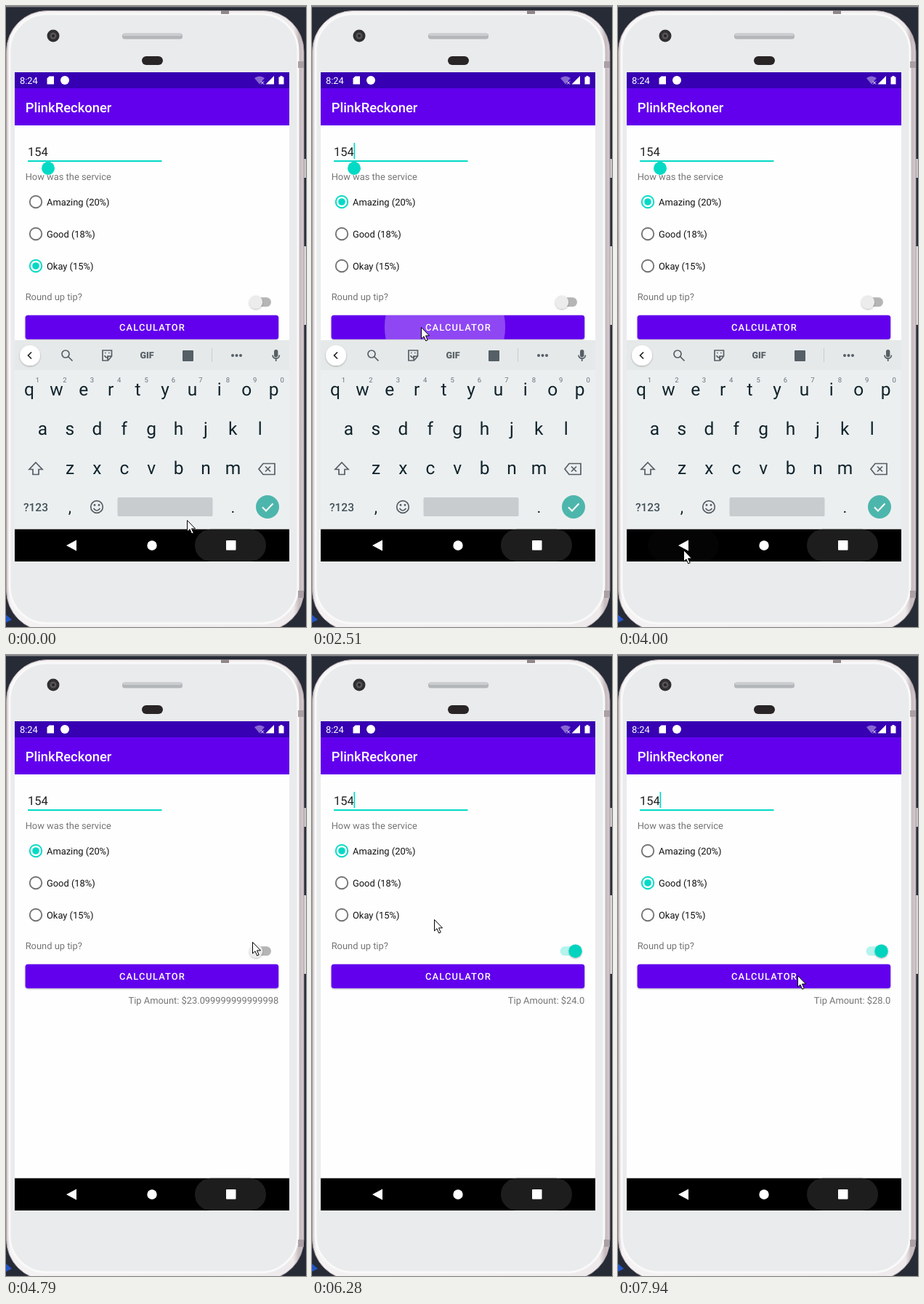
An HTML page for the animation above (8000 ms loop, 413 by 853 pixels).

```html
<!DOCTYPE html>
<html lang="en">
<head>
<meta charset="utf-8">
<title>Tip form demo</title>
<style>
html, body { margin: 0; width: 100%; height: 100%; overflow: hidden; background: #262b36; }
svg { display: block; width: 100vw; height: 100vh; }
text { font-family: Roboto, sans-serif; font-size: 12.88px; white-space: pre; text-rendering: geometricPrecision; }
.mid { text-anchor: middle; }
.soft { fill: #757575; }
.line { fill: none; stroke: #555f65; stroke-width: 1.7; }
</style>
</head>
<body>
<svg viewBox="0 0 413 853">
  <defs>
    <clipPath id="screenClip"><rect x="12" y="91" width="378" height="627.700"/></clipPath>
    <clipPath id="btnClip"><rect x="26.600" y="424.700" width="348.600" height="33.100" rx="3.500"/></clipPath>
    <filter id="shade" x="-30%" y="-30%" width="160%" height="170%">
      <feDropShadow dx="0" dy="1" stdDeviation="1" flood-color="#000" flood-opacity=".3"/>
    </filter>
    <linearGradient id="rim">
      <stop offset="0" stop-color="#cfc5c9"/><stop offset=".012" stop-color="#f5f2f3"/>
      <stop offset=".965" stop-color="#eeeaec"/><stop offset=".985" stop-color="#c4b9bd"/>
      <stop offset="1" stop-color="#d6cdd0"/>
    </linearGradient>
  </defs>

  <!-- phone body -->
  <rect width="413" height="853" fill="#262b36"/>
  <rect width="413" height="1.5" fill="#8b8d90"/>
  <path d="M0 836l8 7-8 4z" fill="#2456c8"/>
  <rect x="407" y="210" width="7" height="26" rx="2" fill="#c9c5c8"/>
  <rect x="407" y="330" width="7" height="108" rx="2" fill="#dcd8da"/>
  <rect x=".5" y="6.500" width="409.500" height="852" rx="56" fill="url(#rim)" stroke="#a99da2"/>
  <rect x="5" y="11" width="397" height="837" rx="51" fill="#e9ebec" stroke="#f9f9f9" stroke-width="3"/>
  <rect x="296" y="6" width="11" height="5" fill="#8e8689"/>
  <rect x="402" y="76" width="8" height="9" fill="#aaa0a4"/>
  <rect x="402" y="803" width="8" height="10" fill="#aaa0a4"/>
  <circle cx="65" cy="41" r="8.5" fill="#302e30"/>
  <circle cx="65" cy="41" r="4.5" fill="#565457"/>
  <circle cx="65" cy="41" r="2" fill="#252426"/>
  <rect x="160" y="37.5" width="83" height="8" rx="3.5" fill="#b4b7ba"/>
  <rect x="161" y="38" width="81" height="3" rx="1.5" fill="#cbcdd0"/>
  <rect x="187" y="69" width="29" height="12" rx="6" fill="#292426"/>

  <!-- app -->
  <rect x="12" y="91" width="378" height="672" fill="#fefefe"/>
  <rect x="12" y="91" width="378" height="22" fill="#3700b3"/>
  <rect x="12" y="113" width="378" height="51" fill="#6200ee"/>
  <g fill="#fff">
    <text x="19" y="107">8:24</text>
    <path d="M59.500 96.500h6.500v11h-9.500v-8z"/>
    <circle cx="81" cy="102" r="6"/>
    <path d="M342 99q7-5 14 0l-7 8.500z" opacity=".4"/>
    <path d="M351 103.500l4 4m0-4l-4 4" stroke="#fff"/>
    <path d="M369 96v11.500h-11.500z"/>
    <path d="M375.500 97.500h2v-1.500h3v1.500h2v10h-7z"/>
    <text x="26.700" y="146" style="font-size:18.4px;font-weight:500">PlinkReckoner</text>
  </g>
  <text x="30" y="206" fill="#212121" style="font-size:16.55px">154</text>
  <rect x="30" y="212" width="184.500" height="2" fill="#03dac5"/>
  <rect id="caret" x="57.500" y="188" width="1.700" height="22" fill="#03dac5"/>
  <text class="soft" x="26.700" y="239">How was the service</text>
  <g id="radios"></g>
  <text class="soft" x="26.700" y="404">Round up tip?</text>
  <rect id="track" x="341.500" y="400.300" width="23.500" height="12.800" rx="6.400"/>
  <circle id="thumb" cy="406.700" r="9.200" filter="url(#shade)"/>
  <rect x="26.600" y="424.700" width="348.600" height="33.100" rx="3.500" fill="#6200ee" filter="url(#shade)"/>
  <g id="ripples" clip-path="url(#btnClip)" fill="#fff"></g>
  <text x="156" y="446" fill="#fff" style="font-weight:500;letter-spacing:1.12px">CALCULATOR</text>
  <text id="tip" class="soft" x="375.200" y="479" text-anchor="end"></text>

  <!-- keyboard -->
  <g clip-path="url(#screenClip)">
    <g id="board">
      <path id="handle" d="M58 212.500l6.400 4.100a9 9 0 1 1-12.800 0z" fill="#03dac5"/>
      <rect x="12" y="459" width="378" height="260" fill="#eceff0"/>
      <rect x="12" y="459" width="378" height="41" fill="#e6e9ea"/>
      <circle cx="33" cy="480" r="14" fill="#fff" filter="url(#shade)"/>
      <path class="line" d="M35 475.500l-4.500 4.500 4.500 4.500" style="stroke:#222"/>
      <g class="line">
        <circle cx="82" cy="478" r="5"/><path d="M85.500 481.500l6 6"/>
        <path d="M133 473h12.500v8l-5 6h-7.500zM145 481h-5v5"/>
        <path d="M135.500 480q3 5 6 1M136 476.500h1.500M141 476.500h1.500"/>
        <path d="M367 479.500a4.700 4.700 0 0 0 9.400 0M371.700 484.500v3.500"/>
      </g>
      <g fill="#555f65">
        <text class="mid" x="194" y="484" style="font-size:12.5px;font-weight:900">GIF</text>
        <rect x="243" y="473" width="15" height="15" rx="1"/>
        <circle cx="312" cy="480" r="2"/><circle cx="317.500" cy="480" r="2"/><circle cx="323" cy="480" r="2"/>
        <rect x="369" y="472" width="5.400" height="10.500" rx="2.700"/>
      </g>
      <path d="M283.500 470v19" stroke="#c9cdd0"/>
      <g id="keys" fill="#10242c"></g>
      <path class="line" d="M41 627l9 9.500h-5v7h-8v-7h-5z"/>
      <path class="line" d="M354 628.500h16v15h-16l-6-7.500zM357 632.500l7 7m0-7l-7 7"/>
      <text class="mid" x="41" y="693.500" fill="#42525a" style="font-size:15.5px;font-weight:500">?123</text>
      <circle class="line" cx="125" cy="688" r="8.300"/>
      <path class="line" d="M120.500 690q4.500 6 9 0"/>
      <circle cx="122" cy="685.500" r="1.400" fill="#555f65"/><circle cx="128" cy="685.500" r="1.400" fill="#555f65"/>
      <rect x="153.500" y="675" width="131" height="26" rx="2" fill="#c8cccf"/>
      <circle cx="360" cy="688" r="16" fill="#4db6ac"/>
      <path d="M353 688.500l5 5 9.500-10" fill="none" stroke="#fff" stroke-width="2"/>
    </g>
  </g>

  <!-- navigation bar -->
  <rect x="12" y="718.700" width="378" height="44.300"/>
  <rect x="260" y="718.700" width="98" height="44.300" rx="22" fill="#1d1d1d"/>
  <rect id="back" x="41" y="718.700" width="98" height="44.300" rx="22" fill="#fff"/>
  <g fill="#fff">
    <path d="M83 741l14-7.500v15z"/>
    <circle cx="201" cy="741" r="6.700"/>
    <rect x="303" y="734" width="13.500" height="13.500" rx="1"/>
  </g>

  <path id="mouse" d="M0 0v15.500l3.500-3.200 2.700 6.200 2.500-1.100-2.700-6h5z" fill="#fff" stroke="#000" stroke-linejoin="round"/>
</svg>
<script>
const LOOP = 8000;
const $ = id => document.getElementById(id);
const clamp = v => Math.max(0, Math.min(1, v));
const lerp = (a, b, k) => a + (b - a) * k;
const ramp = (t, start, len) => clamp((t - start) / len);
const ease = k => k * k * (3 - 2 * k);

function set(el, attrs) {
  for (const k in attrs) el.setAttribute(k, attrs[k]);
}
function add(parent, tag, attrs, label) {
  const el = document.createElementNS('http://www.w3.org/2000/svg', tag);
  set(el, attrs);
  if (label) el.textContent = label;
  return parent.appendChild(el);
}

const BURSTS = [
  [120, 810, 6], [1240, 2240, 8], [2390, 3320, 8], [3470, 3720, 3],
  [4000, 5030, 9], [5180, 6140, 8], [6280, 6640, 4], [6910, 7940, 9]
];
function capture(t) {
  let last = 0;
  for (const [a, b, n] of BURSTS) {
    if (t < a) break;
    const step = (b - a) / (n - 1);
    last = a + step * Math.min(n - 1, Math.floor((t - a + 15) / step));
  }
  return last;
}

// Pointer: time, x, y
const PATH = [
  [0, 249, 706], [60, 249, 706], [500, 236, 500], [810, 198, 380], [1200, 198, 380],
  [1600, 106, 281], [1900, 106, 281], [2230, 150, 441], [2960, 150, 441],
  [3320, 106, 707], [3720, 90, 747], [4130, 90, 747], [4700, 339, 394],
  [5180, 339, 394], [5450, 296, 445], [5870, 296, 445], [6140, 185, 375],
  [6640, 95, 312], [6930, 95, 312], [7167, 111, 423], [7420, 247, 440], [8000, 247, 440]
];
function pointer(t) {
  const i = Math.max(1, PATH.findIndex(p => p[0] >= t));
  const [ta, xa, ya] = PATH[i - 1], [tb, xb, yb] = PATH[i];
  const k = ease(ramp(t, ta, tb - ta));
  return [lerp(xa, xb, k), lerp(ya, yb, k)].map(v => Math.round(v) + 0.5);
}

// Radio buttons: label, y, checked from, checked until
const TEAL = '#03dac5', GREY = '#757575';
const radios = [
  ['Amazing (20%)', 269, 1790, 6910],
  ['Good (18%)', 313, 6910, 1e5],
  ['Okay (15%)', 357, -1e5, 1790]
].map(([label, y, on, off]) => {
  const at = { cx: 41, cy: y };
  add($('radios'), 'text', { x: 56, y: y + 5, fill: '#111' }, label);
  return {
    on, off,
    halo: add($('radios'), 'circle', { ...at, r: 18, fill: TEAL }),
    ring: add($('radios'), 'circle', { ...at, fill: 'none' }),
    dot: add($('radios'), 'circle', { ...at, fill: TEAL })
  };
});
function drawRadio(r, t) {
  const checked = t >= r.on && t < r.off;
  const u = ramp(t, checked ? r.on : t < r.on ? -1e5 : r.off, 350);
  const swell = checked ? Math.sin(Math.PI * clamp(u / 0.5)) : Math.sin(Math.PI * clamp((u - 0.2) / 0.8));
  const w = 1.9 + 3.2 * swell;
  set(r.ring, { r: 9.2 - w / 2, 'stroke-width': w, stroke: checked ? TEAL : GREY });
  set(r.dot, { r: 4.8 * (checked ? clamp((u - 0.3) / 0.4) : 1 - clamp(u / 0.3)) });
  set(r.halo, { opacity: checked ? 0.18 * (1 - ramp(t, r.on, 240)) : 0 });
}

// Button ripples: time, centre, release, strength
const ripples = [
  [2390, 183, 2960, 0.28], [5549, 201, 5880, 0.1],
  [5540, 272, 5880, 0.24], [7420, 217, 7600, 0.24]
].map(([start, cx, up, power]) =>
  ({ start, up, power, el: add($('ripples'), 'circle', { cx, cy: 441 }) }));

function buildKeys() {
  const key = (x, y, label, size) =>
    add($('keys'), 'text', { x, y, class: 'mid', style: `font-size:${size}px` }, label);
  [['qwertyuiop', 32, 535], ['asdfghjkl', 50.5, 589], ['zxcvbnm', 88, 643]].forEach(([row, x, y]) =>
    [...row].forEach((c, i) => key(x + 37.4 * i, y, c, 24.5)));
  [...'1234567890'].forEach((c, i) =>
    set(key(43.5 + 37.4 * i, 517, c, 9.5), { fill: '#66737a' }));
  key(88, 696, ',', 22);
  key(312.5, 696, '.', 22);
}

function draw(t) {
  set($('caret'), { opacity: t > 95 && (t - 95) % 980 < 490 ? 1 : 0 });
  radios.forEach(r => drawRadio(r, t));

  const on = ease(ramp(t, 4920, 240));
  set($('track'), { fill: on > 0.5 ? '#b5f3ed' : '#b5b5b5' });
  set($('thumb'), { cx: lerp(344, 362.6, on), fill: on > 0.5 ? '#00d3be' : '#ececec' });

  for (const { start, up, power, el } of ripples) {
    const age = t - start;
    set(el, {
      r: age < 0 ? 0 : 10 + 0.55 * age,
      opacity: power * (1 - ramp(t, up, 260))
    });
  }
  $('tip').textContent = 'Tip Amount: $' + (t < 5850 ? 154 * 0.15 : t < 7640 ? '24.0' : '28.0');

  const hide = ramp(t, 4180, 160);
  set($('board'), { opacity: 1 - hide, transform: `translate(0 ${26 * hide})` });
  set($('handle'), { opacity: t < 4180 ? 1 : 0 });
  set($('back'), { opacity: 0.12 * ramp(t, 3990, 80) * (1 - ramp(t, 4180, 260)) });

  const [x, y] = pointer(t);
  set($('mouse'), { transform: `translate(${x} ${y})` });
}

buildKeys();
const began = performance.now();
(function tick() {
  draw(capture((performance.now() - began) % LOOP));
  requestAnimationFrame(tick);
})();
</script>
</body>
</html>
```
